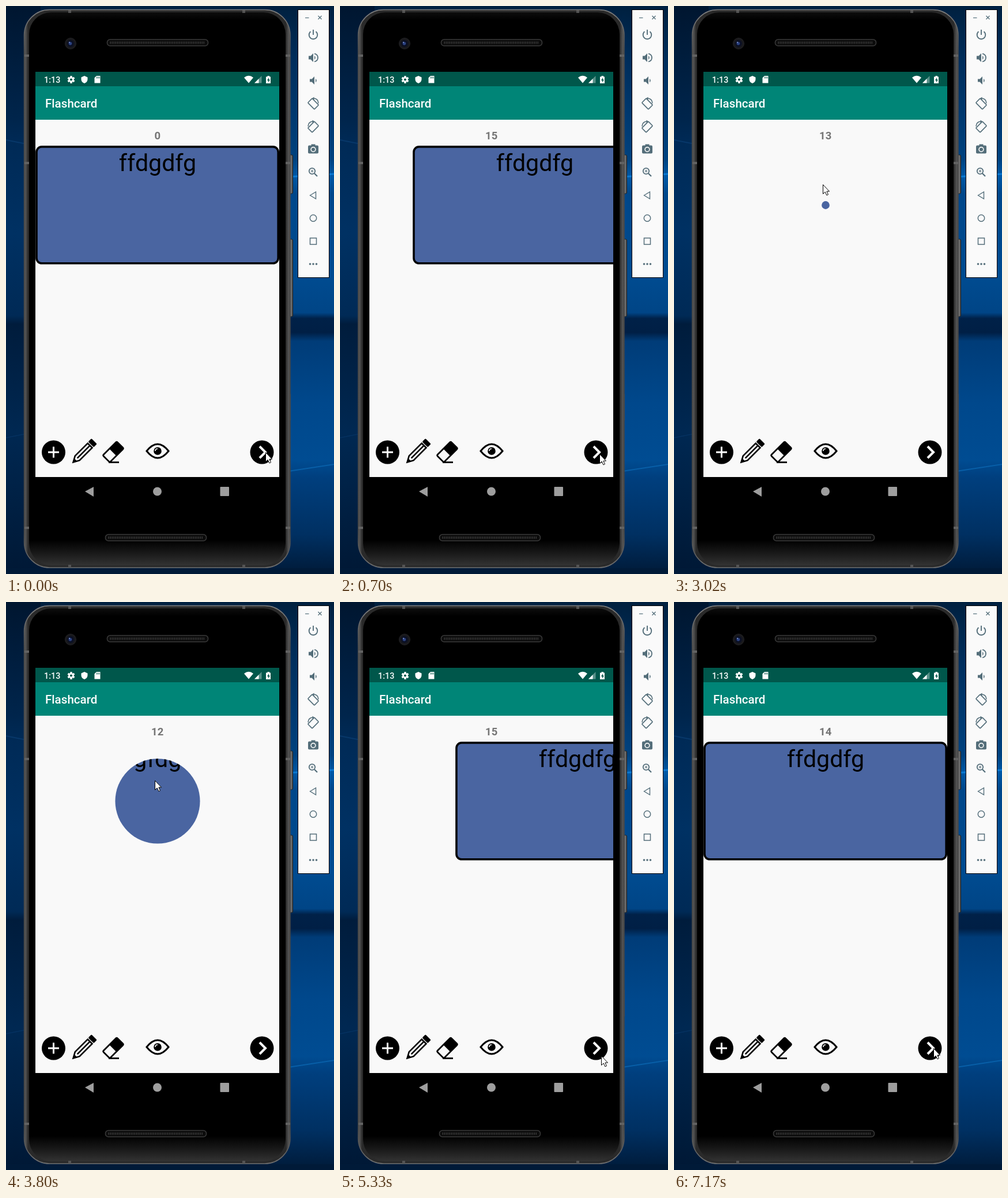
Write an HTML page with a canvas that moves like this. It is 569 by 984 pixels and loops after 8000 ms.

```html
<!DOCTYPE html>
<html lang="en">
<head>
<meta charset="utf-8">
<title>Flashcard</title>
<style>
html, body { margin: 0; width: 100%; height: 100%; overflow: hidden; background: #001a38; }
canvas { display: block; width: 569px; height: 984px; }
</style>
</head>
<body>
<canvas id="stage" width="569" height="984"></canvas>
<script>
const ctx = document.getElementById('stage').getContext('2d');
const LOOP = 8000;
const SCREEN = { x: 51, y: 114, w: 423, h: 702 };
const TICKS = [0, 130, 280, 430, 550, 700, 850, 1000, 1150, 1270, 1420, 1570, 1690, 2350,
  2750, 2870, 3020, 3140, 3290, 3410, 3530, 3650, 3800, 3950, 4070, 4190, 4340, 4490, 4640,
  4790, 4910, 5060, 5190, 5330, 5450, 5570, 6250, 6370, 6520, 6650, 6770, 7170];
const COUNTS = [[0, 0], [280, 15], [1420, 14], [2350, 13], [3290, 12], [4490, 11], [5060, 15], [7170, 14]];
const POINTER = [[0, 450, 773], [130, 450, 776], [850, 437, 750], [1000, 304, 486], [1150, 246, 384],
  [1270, 230, 342], [1420, 233, 312], [1570, 246, 311], [1690, 258, 309], [4340, 264, 317],
  [4490, 386, 526], [4640, 429, 613], [4790, 459, 686], [4910, 468, 731], [5060, 462, 801],
  [5330, 453, 786], [5450, 450, 773]];
const SLIDES = [215, 4930, 6138];
const SLIDE_MS = 671;
const REVEAL = { from: 2750, to: 5060, start: 2702, ms: 2905, radius: 235 };

const last = (rows, t) => rows.filter(r => r[0] <= t).pop();
const ease = p => (1 - Math.cos(Math.PI * Math.min(1, Math.max(0, p)))) / 2;

function gradient(x0, y0, x1, y1, ...stops) {
  const g = ctx.createLinearGradient(x0, y0, x1, y1);
  stops.forEach(([at, color]) => g.addColorStop(at, color));
  return g;
}
function rect(x, y, w, h, fill) { ctx.fillStyle = fill; ctx.fillRect(x, y, w, h); }
function round(x, y, w, h, r, fill, stroke, width = 1) {
  ctx.beginPath();
  ctx.roundRect(x, y, w, h, r);
  paint(fill, stroke, width);
}
function paint(fill, stroke, width) {
  if (fill) { ctx.fillStyle = fill; ctx.fill(); }
  if (stroke) { ctx.strokeStyle = stroke; ctx.lineWidth = width; ctx.stroke(); }
}
function circle(x, y, r, fill, stroke, width = 1) {
  ctx.beginPath();
  ctx.arc(x, y, r, 0, Math.PI * 2);
  paint(fill, stroke, width);
}
function shape(d, fill, stroke, width = 1) {
  const p = new Path2D(d);
  if (fill) { ctx.fillStyle = fill; ctx.fill(p); }
  if (stroke) { ctx.strokeStyle = stroke; ctx.lineWidth = width; ctx.stroke(p); }
}
function text(s, x, y, font, color, align = 'left') {
  ctx.font = font + ' Roboto, sans-serif';
  ctx.fillStyle = color;
  ctx.textAlign = align;
  ctx.fillText(s, x, y);
}
function at(x, y, angle, draw) {
  ctx.save();
  ctx.translate(x, y);
  ctx.rotate(angle);
  draw();
  ctx.restore();
}

function wallpaper() {
  rect(0, 0, 60, 984, gradient(0, 0, 0, 984, [0, '#001630'], [0.2, '#00254c'], [0.24, '#002a56'],
    [0.4, '#003163'], [0.545, '#002a56'], [0.56, '#001c3c'], [0.75, '#002852'], [1, '#001835']));
  shape('M0 232 L40 240', null, '#08386a', 2);
  shape('M0 748 L40 740', null, '#053261', 1.5);
  rect(60, 0, 509, 984, gradient(0, 0, 0, 984, [0, '#00203f'], [0.1, '#002e5c'], [0.27, '#00427f'],
    [0.3, '#0058a6'], [0.33, '#00478a'], [0.48, '#004b90'], [0.54, '#004586'], [0.55, '#002148'],
    [0.575, '#001f45'], [0.59, '#003c78'], [0.7, '#00488c'], [0.8, '#004c92'], [0.83, '#003f7e'],
    [0.93, '#003062'], [1, '#001a38']));
  shape('M490 296 L569 291', null, '#0b78d0', 3);
  shape('M490 806 L569 794', null, '#085fa8', 2);
  rect(0, 974, 569, 10, '#001a38');
}

function speaker(x, y) {
  round(x, y, 175, 11, 5, '#0c0c0c', '#3a3a3a', 1.5);
  ctx.setLineDash([1.5, 1.5]);
  shape(`M${x + 5} ${y + 5.5} h165`, null, '#383838', 4);
  ctx.setLineDash([]);
}

function phone() {
  [[258, 67], [404, 134]].forEach(([y, h]) =>
    round(490, y, 7.5, h, 2, gradient(490, 0, 498, 0, [0, '#222'], [0.6, '#777'], [1, '#333']), '#222'));
  rect(492, 672, 2, 46, '#555');
  round(31.5, 6.5, 461.5, 966.5, 44, gradient(31, 0, 493, 0, [0, '#444'], [0.006, '#555'],
    [0.016, '#2a2a2a'], [0.984, '#2a2a2a'], [0.994, '#555'], [1, '#444']),
    gradient(0, 0, 0, 984, [0, '#858585'], [0.08, '#4c4c4c'], [0.92, '#444'], [1, '#777']), 1.5);
  round(40, 11, 445, 958, 38, gradient(0, 0, 0, 984, [0, '#171717'], [0.025, '#000'],
    [0.94, '#000'], [0.965, '#1b1b1b'], [0.985, '#333']));
  for (const x of [32, 485]) for (const y of [84, 270, 902]) rect(x, y, 8, 4, '#626262');
  for (const x of [108, 410]) for (const y of [7, 968]) rect(x, y, 5, 5, '#555');
  speaker(175.5, 58);
  speaker(172.5, 915.5);
  circle(112, 65, 9.5, '#19191c', '#232326');
  circle(112, 65, 6, '#0b1024');
  circle(111.5, 65, 2.8, '#2c4282');
  circle(110, 63, 1.1, '#7f96d2');
  shape('M137 841 L152 833 V850 Z', '#9e9e9e');
  circle(262.5, 841, 7.5, '#9e9e9e');
  round(371.5, 833, 15.5, 16, 1, '#9e9e9e');
}

function gear(x, y) {
  at(x, y, 0, () => {
    for (let i = 0; i < 6; i++) {
      rect(-1.7, -6.4, 3.4, 4, '#fff');
      ctx.rotate(Math.PI / 3);
    }
  });
  circle(x, y, 3.4, null, '#fff', 2.6);
}

function appBars() {
  rect(51, 114, 423, 25, '#00574b');
  rect(51, 139, 423, 58, '#008577');
  text('1:13', 66, 132.5, '500 14.4px', '#fff');
  text('Flashcard', 68, 176, '500 20.6px', '#fff');
  gear(113, 127.5);
  shape('M136 121 L141.5 123.4 V127 Q141.5 132 136 134 Q130.5 132 130.5 127 V123.4 Z', '#fff');
  shape('M157 121 H163.5 V133.5 H153.5 V124.5 Z', '#fff');
  shape('M157.5 122.5 v3 M159.7 122.5 v3 M161.9 122.5 v3', null, '#00574b', 1);
  shape('M413 124 Q421 117.6 429 124 L421 133.5 Z', '#fff');
  shape('M443.5 121 V133.5 H431 Z', 'rgba(255,255,255,.35)');
  shape('M438.5 126 V133.5 H431 Z', '#fff');
  shape('M453.5 121 h3.5 v1.5 h2 v11.5 h-8 v-11.5 h2.5 Z', '#fff');
  shape('M456 124 L453 129 H455 V132.5 L458 127.5 H456 Z', '#00574b');
}

function buttons() {
  circle(82.5, 773, 20.5, '#000');
  shape('M73 773 H92 M82.5 763.5 V782.5', null, '#fff', 3);
  circle(444, 773, 20.5, '#000');
  shape('M440 763 L450 773 L440 783', null, '#fff', 4);
  at(135, 772, -Math.PI / 4, () => {
    shape('M-16 -5.5 H15 V5.5 H-16 L-26 0 Z M-16 0 H15', null, '#000', 2.6);
    shape('M-28 0 L-20 -3.5 V3.5 Z', '#000');
    round(17.5, -6.8, 8, 13.6, 1.5, '#000');
  });
  at(186, 772.5, -Math.PI / 4, () => {
    round(-17, -8.5, 34, 17, 2, null, '#000', 2.8);
    rect(-1, -8.5, 18, 17, '#000');
  });
  shape('M178 790.5 H196', null, '#000', 2.8);
  shape('M244 771 Q263 747 282 771 Q263 795 244 771 Z', null, '#000', 3);
  circle(263, 771, 6.8, '#000');
  shape('M259 771 Q259 767 263 767', null, '#fff', 1.6);
}

function card(label, dx = 0) {
  round(53 + dx, 243.9, 419.2, 201.9, 9, '#4a65a1', '#000', 3.6);
  text(label, 263 + dx, 286, '41.1px', '#000', 'center');
}

function cards(t) {
  ctx.save();
  ctx.beginPath();
  ctx.rect(SCREEN.x, SCREEN.y, SCREEN.w, SCREEN.h);
  ctx.clip();
  if (t >= REVEAL.from && t < REVEAL.to) {
    ctx.beginPath();
    ctx.arc(263, 345, REVEAL.radius * ease((t - REVEAL.start) / REVEAL.ms), 0, Math.PI * 2);
    ctx.clip();
    card('dfgfdgdf');
  } else {
    const start = SLIDES.filter(s => s <= t).pop();
    const p = start === undefined ? 1 : (t - start) / SLIDE_MS;
    card('ffdgdfg', p > 0.93 ? 0 : Math.round(SCREEN.w * (1 - ease(p))));
  }
  ctx.restore();
}

function rotateIcon(y, side) {
  ctx.save();
  ctx.translate(533, y);
  ctx.scale(side, 1);
  at(0, 1, Math.PI / 4, () => round(-8, -5.3, 16, 10.6, 1.2, null, '#546e7a', 1.7));
  shape('M0 -8.5 Q8.5 -8.5 9 0', null, '#546e7a', 1.6);
  shape('M1.5 -11 L-2 -8.5 L1.5 -6 Z', '#546e7a');
  ctx.restore();
}

function sidePanel() {
  const ink = '#546e7a';
  rect(506, 6, 55, 465, '#000');
  rect(507, 7, 53, 463, '#fafafa');
  shape('M519 20.5 h6.5', null, ink, 1.2);
  shape('M541.5 17 l6 6 m0 -6 l-6 6', null, ink, 1.3);
  ctx.beginPath();
  ctx.arc(533, 50, 7.3, -0.9, Math.PI + 0.9);
  paint(null, ink, 1.9);
  shape('M533 41 v9', null, ink, 1.9);
  shape('M525 86.5 h3.5 l4.5 -4.5 v15 l-4.5 -4.5 h-3.5 Z', ink);
  shape('M535 86 q3.5 3.5 0 7', ink);
  shape('M535 82.5 Q541 84 541 89.5 T535 96.5', null, ink, 1.8);
  shape('M527 126.5 h3.5 l4.5 -4.5 v14 l-4.5 -4.5 h-3.5 Z', ink);
  shape('M537 126 q3.5 3 0 6.5', ink);
  rotateIcon(168.5, 1);
  rotateIcon(208.5, -1);
  round(524, 241.5, 18, 14, 2, ink);
  rect(529.5, 239.5, 7, 3, ink);
  circle(533, 248.5, 3.9, null, '#fafafa', 1.6);
  circle(531, 286, 5.2, null, ink, 1.8);
  shape('M535 290 l5 5', null, ink, 2.2);
  shape('M528.5 286 h5 M531 283.5 v5', null, ink, 1.2);
  shape('M527.5 328 L537.5 322 V334 Z', null, ink, 1.4);
  circle(533, 367.5, 5.7, null, ink, 1.5);
  shape('M527.5 402 h11 v11 h-11 Z', null, ink, 1.5);
  for (const x of [527.5, 533, 538.5]) circle(x, 447, 1.8, ink);
}

function pointer(t) {
  const [, x, y] = last(POINTER, t);
  at(x + 0.5, y + 0.5, 0, () =>
    shape('M0 0 V16 L3.7 12.6 L6.4 18.4 L9 17.2 L6.4 11.6 H11 Z', '#fff', '#000', 1));
}

function draw(now) {
  const time = now % LOOP;
  const t = TICKS.filter(s => s <= time).pop();
  wallpaper();
  phone();
  rect(SCREEN.x, SCREEN.y, SCREEN.w, SCREEN.h, '#f9f9f9');
  appBars();
  text(String(last(COUNTS, t)[1]), 262.7, 231, 'bold 18.5px', '#757575', 'center');
  cards(t);
  buttons();
  sidePanel();
  pointer(t);
}

const began = performance.now();
function loop() {
  draw(performance.now() - began);
  requestAnimationFrame(loop);
}
loop();
</script>
</body>
</html>
```
